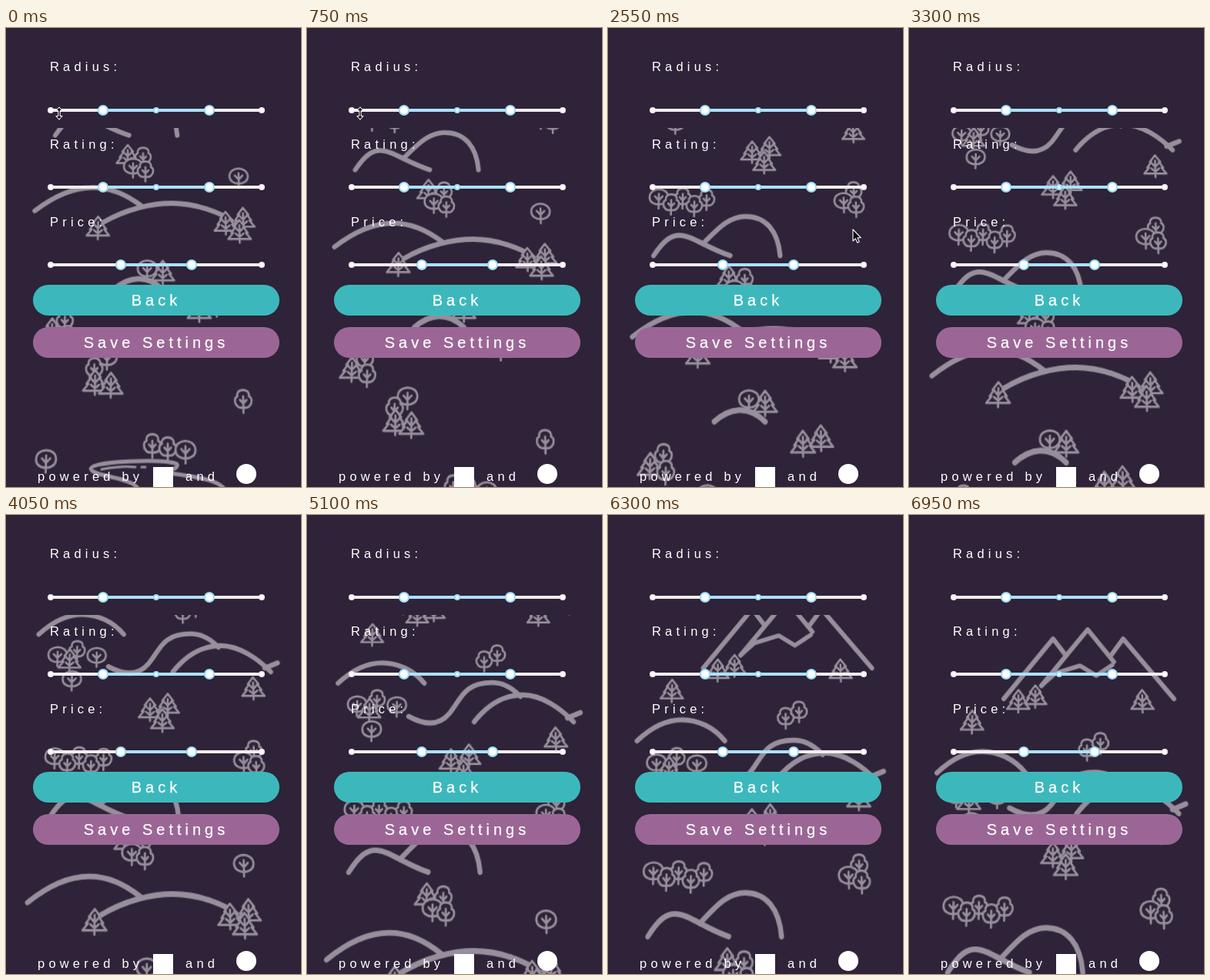
An HTML page for the animation above (7.05 s loop, 383 by 597 pixels).

```html
<!DOCTYPE html>
<html lang="en">
<head>
<meta charset="utf-8">
<title>Settings</title>
<style>
  html, body { margin: 0; width: 100%; height: 100%; overflow: hidden; background: #2e2338; }
  #stage { position: relative; width: 383px; height: 597px; overflow: hidden; background: #2e2338;
    color: #fff; font: 16.5px "Liberation Sans", Arial, sans-serif; letter-spacing: 5.2px;
    -webkit-text-stroke: .25px #fff; }
  #view { position: absolute; left: 0; top: 130px; width: 383px; height: 467px; overflow: hidden; }
  #land { position: absolute; left: 0; top: -130px; overflow: visible; transform-origin: 191.5px 0;
    fill: none; stroke: #978f9b; stroke-linecap: round; stroke-linejoin: round; }
  #land .tree { fill: #2e2338; stroke-width: 2.6; }
  #ui, .cursor { position: absolute; left: 0; top: 0; }
  #ui text { fill: #fff; }
  .cursor { overflow: visible; fill: #000; stroke: #fff; stroke-width: 1.1; stroke-linejoin: round; }
  .button { position: absolute; left: 35px; width: 320px; height: 40px; border-radius: 20px;
    font-size: 20px; line-height: 40px; letter-spacing: 5px; text-align: center; }
</style>
</head>
<body>
<div id="stage">
  <div id="view"><svg id="land" width="383" height="597"></svg></div>
  <svg id="ui" width="383" height="597">
    <g id="sliders"></g>
    <text x="57" y="56">Radius:</text>
    <text x="57" y="157">Rating:</text>
    <text x="57" y="258">Price:</text>
    <text x="41" y="589">powered by</text>
    <text x="233" y="589">and</text>
    <rect x="191" y="571" width="26" height="26" fill="#fff"/>
    <circle cx="312" cy="580" r="13" fill="#fff"/>
  </svg>
  <div class="button" style="top:334px;background:#3cb8bc">Back</div>
  <div class="button" style="top:389px;background:#9b6695">Save Settings</div>
  <svg class="cursor" id="resize" width="1" height="1">
    <path d="M0-8L4-3.5H1.2V3.5H4L0 8L-4 3.5H-1.2V-3.5H-4Z"/>
  </svg>
  <svg class="cursor" id="arrow" width="1" height="1">
    <path d="M0 0V15L3.4 11.8L5.8 17.2L8.2 16L5.9 10.8H10.4Z"/>
  </svg>
</div>
<script>
const $ = id => document.getElementById(id);
const LOOP = 7050, STEP = 150, LAST = 6950;
const MID = 191.5, TILT = 2.43e-4, SPEED = 0.05537;

// The landscape is a tilted plane sliding towards the viewer at constant speed.
// toPlane turns a screen point seen at time t into plane coordinates.
function toPlane(t, x, y) {
  const s = 1 + TILT * y;
  return [MID + (x - MID) / s, y / s - SPEED * t].map(n => n.toFixed(2));
}

const shapes = {
  pine: 'M0-14.5L-7-6H-5L-10.5 1H-8L-14.5 8.5H14.5L8 1H10.5L5-6H7Z M0-8V13 M-4-4L0 0L4-4 M-5 2L0 6L5 2',
  leafy: 'M0-12C-6-12-8-8-7-5C-11-4-11 2-8 5C-6 8-3 7.5 0 7.5C3 7.5 6 8 8 5C11 2 11-4 7-5C8-8 6-12 0-12Z' +
    'M0-5V13 M-4-1L0 3L4-1',
  round: 'M-12 0C-12-13 12-13 12 0C12 12-12 12-12 0Z M0-4V14 M-5-1L0 4L5-1'
};

let art = '';
function line(t, width, d) {
  const p = d.replace(/([\d.]+),([\d.]+)/g, (_, x, y) => toPlane(t, +x, +y).join());
  art += `<path d="${p}" stroke-width="${width}"/>`;
}
function trees(t, kind, ...spots) {
  for (const [x, y] of spots)
    art += `<path class="tree" d="${shapes[kind]}" transform="translate(${toPlane(t, x, y)}) scale(.95)"/>`;
}

// Peaks
line(6950, 5.6, 'M123,239L187,161L204,183 M172,222L204,183L232,149L266,191 M262,183L278,161L344,239');
line(6950, 5.2, 'M172,222L190,206L222,196L243,209L264,195');
trees(6950, 'pine', [164, 237], [142, 243], [303, 243], [82, 270]);

// Lone hill, river bend
line(5700, 5.8, 'M39,256C60,236 80,229 97,229C118,229 138,239 152,256');
trees(5100, 'leafy', [247, 182], [230, 190]);
line(5100, 5.8, 'M132,262C150,272 170,276 185,258C200,240 203,218 240,218C256,218 268,226 277,236');
line(5100, 5.8, 'M217,269C240,240 262,234 280,234C305,234 330,252 346,269 M338,264L355,257');
trees(5700, 'round', [64, 284], [116, 285]);
trees(5700, 'leafy', [90, 278]);
trees(5700, 'pine', [80, 292]);
trees(5700, 'round', [83, 317]);
trees(5100, 'pine', [323, 292]);
trees(4050, 'pine', [210, 248], [187, 254], [203, 268]);

// Grove and twin hills
trees(2550, 'round', [66, 220]);
trees(2550, 'leafy', [97, 221], [82, 229], [128, 223], [112, 231], [319, 213]);
trees(2550, 'round', [306, 225]);
trees(2550, 'leafy', [322, 232]);
line(5700, 5.8, 'M53,506C68,482 78,477 88,477C105,477 125,495 157,506');
line(5700, 5.8, 'M120,489C140,468 155,450 178,450C205,450 222,470 225,506');
trees(0, 'pine', [158, 167]);
trees(0, 'leafy', [178, 168]);
trees(0, 'round', [165, 180]);
trees(0, 'leafy', [181, 186]);
trees(0, 'round', [302, 193]);

// Wide hills
line(4050, 5.8, 'M28,504C60,478 88,470 108,470C135,470 158,483 175,497');
line(4050, 5.8, 'M122,521C155,501 190,493 217,493C250,493 285,507 299,519');
trees(4050, 'pine', [115, 530], [315, 517], [291, 523], [310, 535]);

// Foreground
line(2550, 6, 'M138,512C158,494 182,490 204,512');
trees(2550, 'round', [183, 483]);
trees(2550, 'pine', [204, 489]);
trees(1350, 'pine', [275, 451], [252, 458], [57, 486]);
trees(1350, 'leafy', [74, 472], [77, 493]);
trees(1350, 'round', [130, 521]);
trees(1350, 'leafy', [113, 537]);
trees(1350, 'pine', [114, 556], [135, 560]);
trees(0, 'leafy', [308, 485], [190, 543], [210, 547]);
line(0, 4, 'M172,600C165,584 112,584 110,573C112,563 205,560 222,567C226,573 208,575 214,579C240,584 275,586 284,600');
line(0, 2.6, 'M124,574C145,570 160,570 168,571 M176,571L181,571');
trees(0, 'round', [233, 549], [52, 561]);
$('land').innerHTML = art;

const dot = (x, y, r, edge, w) =>
  `<circle cx="${x}" cy="${y}" r="${r}" fill="#fff" stroke="${edge}" stroke-width="${w}"/>`;
function slider(y, from, to, mid) {
  const blue = '#9bdcfb';
  return `<rect x="57" y="${y - 2}" width="275" height="4" rx="2" fill="#f0edee"/>` +
    `<rect x="${from}" y="${y - 2}" width="${to - from}" height="4" fill="#abe2fb"/>` +
    dot(58, y, 3, '#f0edee', 2) + dot(332, y, 3, '#f0edee', 2) +
    (mid ? dot(195, y, 3, blue, 2) : '') +
    dot(from, y, 6, blue, 2) + dot(to, y, 6, blue, 2);
}
$('sliders').innerHTML = slider(107, 126, 264, true) + slider(207, 126, 264, true) + slider(308, 149, 241, false);

// Pointer stops: time, x, y, shape
const stops = [
  [0, 69, 111, 'resize'], [1200, 190, 92, 'resize'], [1350, 294, 69, 'resize'],
  [1500, 312, 34, 'resize'], [1800, 322, 95, 'resize'], [1950, 320, 180, 'arrow'],
  [2100, 318, 262, 'arrow'], [3300, 0, 0, '']
];

function show(t) {
  $('land').style.transform =
    `matrix3d(1,0,0,0, 0,1,0,${-TILT}, 0,0,1,0, 0,0,0,1) translateY(${SPEED * t}px)`;
  const [, x, y, kind] = stops.filter(s => s[0] <= t).pop();
  for (const id of ['resize', 'arrow']) {
    $(id).style.display = id === kind ? 'block' : 'none';
    $(id).style.transform = `translate(${x}px, ${y}px)`;
  }
}

const start = performance.now();
function tick() {
  const t = (performance.now() - start) % LOOP;
  show(t >= LAST ? LAST : Math.min(Math.floor(t / STEP) * STEP, 6750));
  requestAnimationFrame(tick);
}
tick();
</script>
</body>
</html>
```
